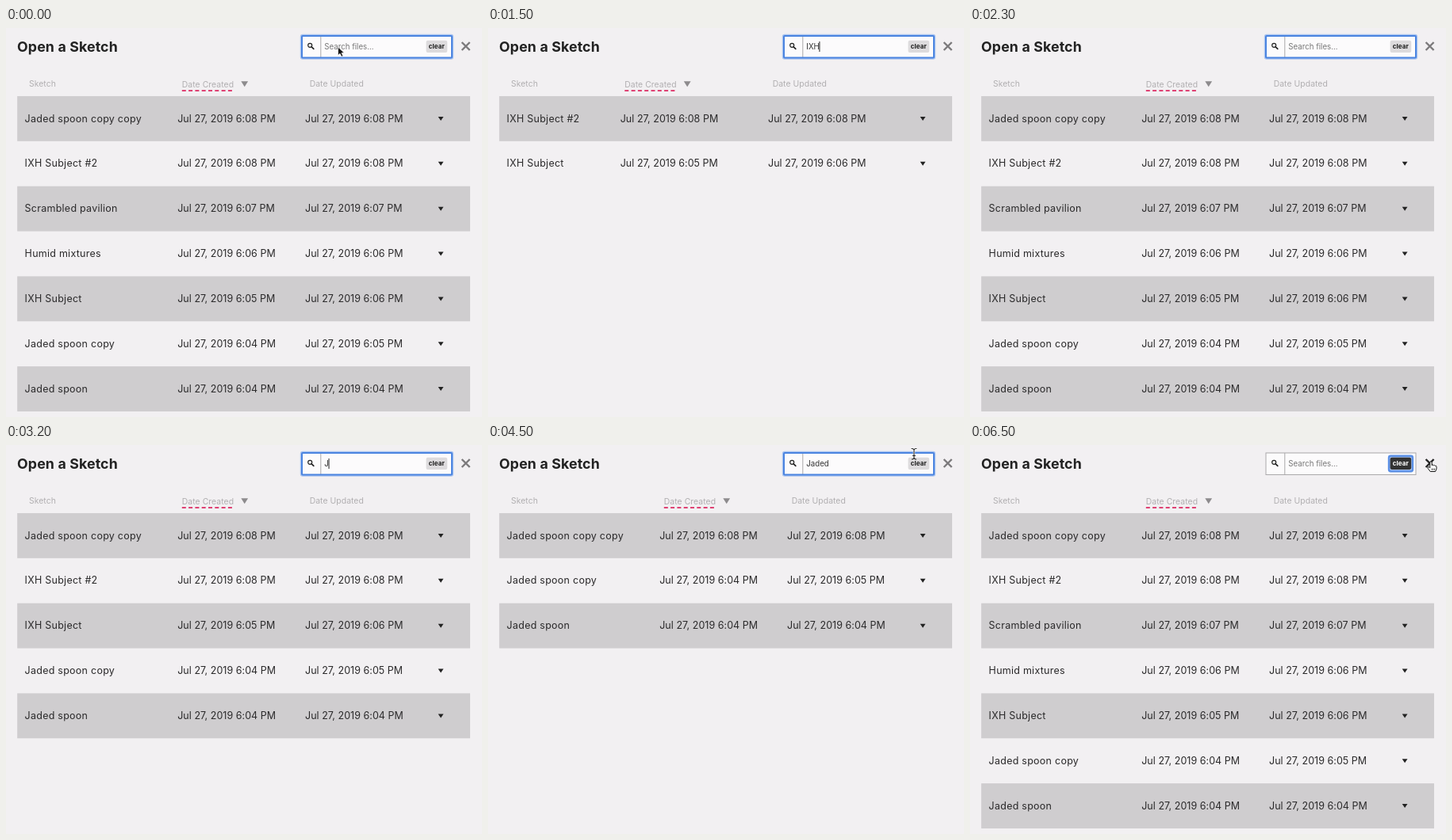
Animation, 600 px wide and 491 px high, one loop 6700 ms. Source, as an HTML page:

```html
<!DOCTYPE html>
<html lang="en">
<head>
<meta charset="utf-8">
<title>Open a Sketch</title>
<style>
  html, body { margin: 0; width: 100%; height: 100%; overflow: hidden; background: #f2f0f2; }
  svg { display: block; width: 600px; height: 491px; }
  text { font-family: Inter, "Open Sans", sans-serif; fill: #2b2a2b; white-space: pre; }
  .title { font-size: 17.8px; font-weight: 700; letter-spacing: .12px; fill: #222; }
  .head { font-size: 10.4px; letter-spacing: .05px; fill: #b1afb1; }
  .cell { font-size: 12.5px; letter-spacing: .25px; }
  .date { letter-spacing: .03px; }
  .field { font-size: 9.7px; fill: #333; }
  .hint { fill: #777; }
  .clear { font-size: 8.2px; font-weight: 700; }
</style>
</head>
<body>
<svg id="stage" viewBox="0 0 600 491">
  <rect width="600" height="491" fill="#f2f0f2"/>
  <text class="title" x="14" y="30">Open a Sketch</text>
  <g id="list"></g>
  <rect x="373" y="10" width="189" height="27.5" fill="#fcfbfc" stroke="#aaa8aa"/>
  <path d="M396.8 10V37.5" stroke="#aaa8aa"/>
  <g fill="none" stroke="#222">
    <circle cx="383.2" cy="21.8" r="2.5" stroke-width="1.2"/>
    <path d="M385.2 23.8L387.8 26.4" stroke-width="1.7" stroke-linecap="round"/>
  </g>
  <g id="fieldRing" fill="none">
    <rect x="372" y="9" width="191" height="29.5" rx="2" stroke="#a9c4f0" stroke-width="2.4"/>
    <rect x="373" y="10" width="189" height="27.5" rx="1" stroke="#4a84e0" stroke-width="2"/>
  </g>
  <text id="field" class="field" x="401.3" y="26.8"></text>
  <rect id="caret" y="17" width="1" height="13" fill="#222"/>
  <rect id="buttonRing" x="528.2" y="14" width="29.6" height="19" rx="2"
    fill="none" stroke="#5c90e6" stroke-width="2.8"/>
  <rect id="button" x="529.6" y="15.8" width="26.6" height="15.2" rx="2"/>
  <text id="buttonLabel" class="clear" x="532.8" y="26.2">clear</text>
  <path id="close" d="M574.6 18L584.6 28M584.6 18L574.6 28" fill="none" stroke-width="2.4"/>
  <g id="mouse">
    <path id="arrow" d="M0 0V10.6L2.5 8.3L4.4 12.2L6.3 11.3L4.5 7.5H7.8Z"
      fill="#111" stroke="#fff" stroke-width=".7"/>
    <g id="beam" fill="none" stroke-linecap="round">
      <path d="M-3 -6.5Q0 -6.5 0 -4.5Q0 -6.5 3 -6.5M0 -4.5V5M-3 7Q0 7 0 5Q0 7 3 7M-1.5 2.5H1.5"
        stroke="#fff" stroke-width="2.4"/>
      <path d="M-3 -6.5Q0 -6.5 0 -4.5Q0 -6.5 3 -6.5M0 -4.5V5M-3 7Q0 7 0 5Q0 7 3 7M-1.5 2.5H1.5"
        stroke="#222" stroke-width="1.1"/>
    </g>
    <g id="hand">
      <path d="M-1.2 .9Q0 -.5 1.2 .9V5Q2.3 4 3.4 5.3Q4.5 4.4 5.3 5.8Q6.7 5.2 7 6.8V9.5L5.6 13H-.8L-3.9 8.8Q-4.4 7 -2.7 7.1L-1.2 8.4Z"
        fill="#fff" stroke="#111" stroke-width="1" stroke-linejoin="round"/>
      <path d="M1.1 9V11.4M2.8 9V11.4M4.5 9V11.4" stroke="#111" stroke-width=".7"/>
    </g>
  </g>
</svg>
<script>
const LOOP = 6700, ROW = 56.85, TOP = 86;

// name, minute created, minute updated
const sketches = [
  ['Jaded spoon copy copy', 8, 8],
  ['IXH Subject #2', 8, 8],
  ['Scrambled pavilion', 7, 7],
  ['Humid mixtures', 6, 6],
  ['IXH Subject', 5, 6],
  ['Jaded spoon copy', 4, 5],
  ['Jaded spoon', 4, 4],
  ['Plain ribbon', 3, 3],
];

const typed = [
  [0, ''], [200, 'I'], [400, 'IX'], [500, 'IXH'], [1800, 'IX'], [2000, 'I'], [2100, ''],
  [3000, 'J'], [3400, 'Ja'], [3600, 'Jad'], [3700, 'Jade'], [3900, 'Jaded'], [5100, ''],
];

// time, applied filter, width of the name column
const filters = [
  [0, '', 147], [500, 'I', 124], [800, 'IXH', 93], [1900, 'IX', 96], [2300, '', 147],
  [3200, 'J', 147], [3700, 'Ja', 147], [5200, '', 147],
];

const pointer = [
  [0, 'arrow', 418.5, 24], [100, 'beam', 419, 25], [200, ''],
  [4000, 'beam', 419, 27], [4100, 'beam', 420, 26], [4200, 'beam', 421, 25],
  [4300, 'beam', 446, 21], [4400, 'beam', 498, 13], [4500, 'beam', 537, 11],
  [4600, 'beam', 546, 8], [4700, 'beam', 549, 12], [4800, 'hand', 547, 20],
  [4900, 'hand', 541, 25.2], [5800, 'hand', 547, 25], [5900, 'arrow', 560, 25],
  [6000, 'arrow', 570, 24], [6100, 'hand', 578, 23], [6300, 'hand', 580, 22],
  [6400, 'hand', 581, 21], [6500, 'hand', 581, 20.5],
];

const caretOn = [[200, 1000], [1500, 2100], [2500, 4400]];

const el = id => document.getElementById(id);
const show = (id, on) => el(id).style.display = on ? '' : 'none';
const at = (steps, t) => steps.findLast(step => step[0] <= t);
const label = (kind, x, y, text) => `<text class="${kind}" x="${x}" y="${y}">${text}</text>`;
const stamp = minute => `Jul 27, 2019 6:0${minute} PM`;

function tableMarkup(query, nameWidth) {
  const created = 167 + .917 * (nameWidth - 93);
  const updated = 353 + .444 * (nameWidth - 93);
  const head = label('head', 29, 74, 'Sketch')
    + label('head', created + 5.3, 74.5, 'Date Created')
    + label('head', updated + 5.7, 74, 'Date Updated')
    + `<path d="M${created + 5.3} 79.2h63.5" stroke="#dc2a62" stroke-width="1.8" stroke-dasharray="5 3.3"/>`
    + `<path d="M${created + 79.8} 67.2h8.8l-4.4 7z" fill="#8d8b8d"/>`;
  const found = sketches.filter(([name]) => name.toLowerCase().includes(query.toLowerCase()));
  const rows = found.map(([name, made, changed], i) => {
    const y = TOP + i * ROW, base = y + 32.6;
    const band = i % 2 ? '' : `<rect x="14.2" y="${y}" width="570.8" height="${ROW}" fill="#cfcdcf"/>`;
    return band + label('cell', 23.6, base, name)
      + label('cell date', created - .3, base, stamp(made))
      + label('cell date', updated, base, stamp(changed))
      + `<path d="M544.7 ${y + 26}h6.8l-3.4 5z" fill="#222"/>`;
  });
  return head + rows.join('');
}

let shownFilter;
function draw(t) {
  const filter = at(filters, t);
  if (filter !== shownFilter) {
    el('list').innerHTML = tableMarkup(filter[1], filter[2]);
    shownFilter = filter;
  }

  const text = at(typed, t)[1], field = el('field');
  field.textContent = text || 'Search files...';
  field.classList.toggle('hint', !text);
  show('caret', caretOn.some(([from, to]) => t >= from && t < to));
  el('caret').setAttribute('x', 401 + (text ? field.getComputedTextLength() : 0));

  const cleared = t >= 5000, dark = t >= 4800;
  show('fieldRing', !cleared);
  show('buttonRing', cleared);
  el('button').setAttribute('fill', dark ? '#333' : '#dddbdd');
  el('buttonLabel').style.fill = dark ? '#fff' : '#222';
  el('close').setAttribute('stroke', t >= 6100 ? '#222' : '#7b797b');

  const [, shape, x = 0, y = 0] = at(pointer, t);
  for (const id of ['arrow', 'beam', 'hand']) show(id, id === shape);
  el('mouse').setAttribute('transform', `translate(${x} ${y})`);
}

const start = performance.now();
function tick() {
  draw((performance.now() - start) % LOOP);
  requestAnimationFrame(tick);
}
tick();
</script>
</body>
</html>
```
